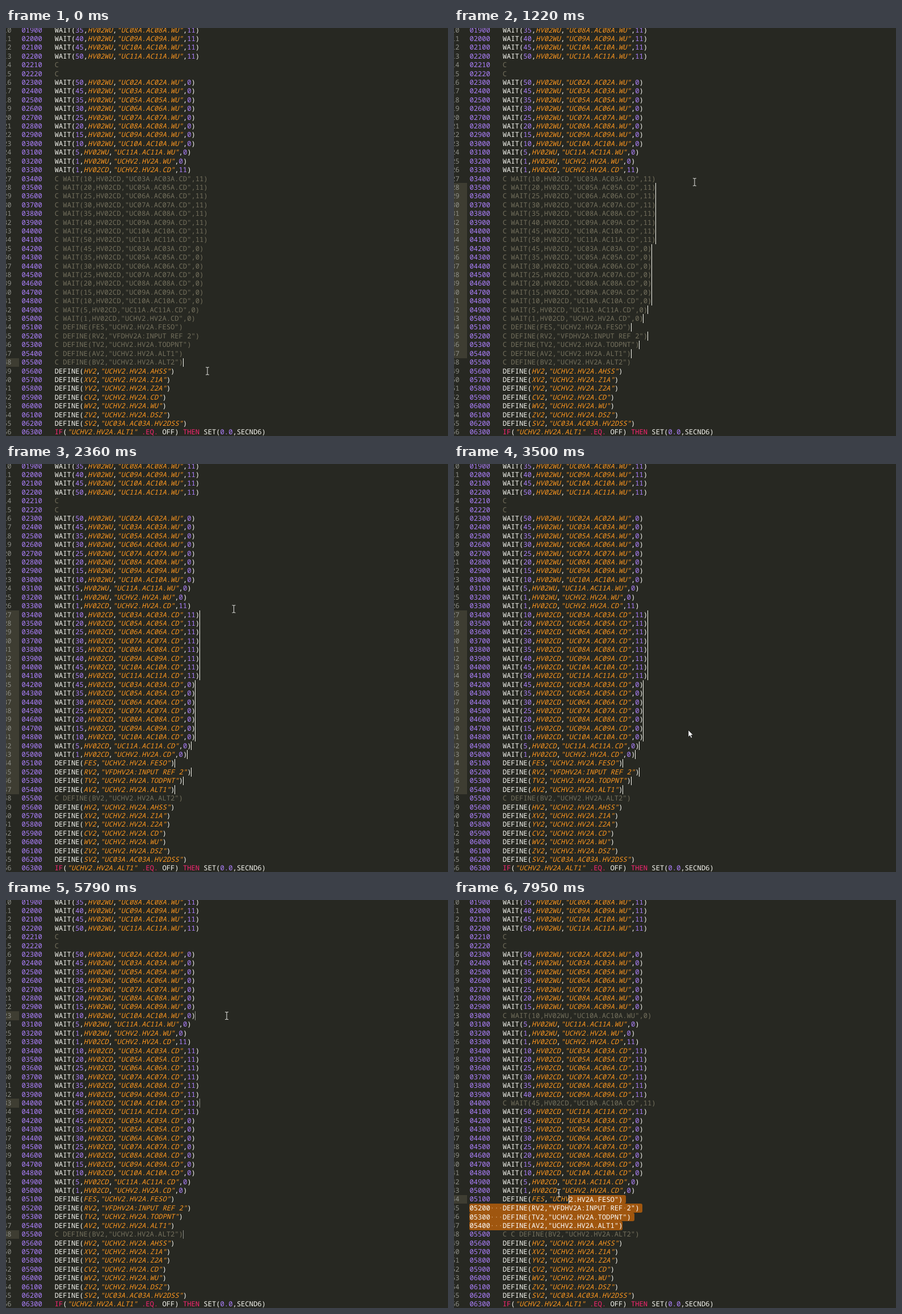
An HTML page for the animation above (8000 ms loop, 779x719 px).

```html
<!DOCTYPE html>
<html lang="en">
<head>
<meta charset="utf-8">
<title>Multi-caret editing</title>
<style>
html, body { margin: 0; width: 100%; height: 100%; overflow: hidden; background: #272822; }
#stage {
  position: relative; width: 779px; height: 719px; overflow: hidden;
  background: #272822; color: #f8f8f2;
  font: 500 12.167px/15.41px "Noto Sans Mono", "DejaVu Sans Mono", monospace;
  text-rendering: geometricPrecision; font-variant-ligatures: none;
}
#stage div { position: absolute; white-space: pre; }
#stage svg { position: absolute; left: 0; top: 0; overflow: visible; }
.no { left: -5px; color: #8f908a; }
.arg { color: #fd971f; font-style: italic; }
.key { color: #f92672; }
.num { color: #ae81ff; }
.rem { color: #75715e; }
.mark { left: 0; width: 23px; height: 15.41px; background: #3e3d32; }
.caret { width: 1px; height: 15.41px; background: #f8f8f0; }
.sel { height: 15.41px; background: #9f560f; border-radius: 3px; color: #fff; }
.sel i { font-style: normal; color: #d3a272; }
</style>
</head>
<body>
<div id="stage">
  <div id="marks"></div>
  <div id="text"></div>
  <div id="over"></div>
  <svg width="1" height="1">
    <path id="beam" d="M-3 -6.5H-1L0 -5.5L1 -6.5H3M0 -5.5V5.5M-3 6.5H-1L0 5.5L1 6.5H3" fill="none" stroke="#d6d6d2" stroke-width="1.1"/>
    <path id="arrow" d="M0 0V12L2.8 9.4L4.8 14L6.8 13.1L4.8 8.7H8.5Z" fill="#fff" stroke="#111" stroke-width=".7"/>
  </svg>
</div>
<script>
const LOOP = 8000, FIRST = 10, LAST = 56, CHAR = 7.3, PITCH = 15.41, TOP = 257.9;
const INDENT = 8, DRAG_LAG = 40;
const UNCOMMENT = 2360, COMMENT = 6200, ARROW_ON = 3500, ARROW_OFF = 3650;

const $ = id => document.getElementById(id);
const colX = col => 27.4 + col * CHAR;
const rowY = row => TOP + (row - 27) * PITCH;
const rowAt = y => 27 + Math.floor((y - TOP) / PITCH);
const span = (a, b) => Array.from({ length: b - a + 1 }, (_, i) => a + i);

// Program text: waits climb or fall by 5 per unit; unit 4 does not exist
const code = {};
let next = FIRST;
const add = s => { code[next++] = s; };
const wait = (n, kind, unit, value) => add(`WAIT(${n},HV02${kind},"${unit}.${kind}",${value})`);
const waits = (kind, value, from) => span(from, 11).filter(u => u !== 4).forEach(u => {
  const id = String(u).padStart(2, "0");
  wait(value ? 5 * u - 5 : 60 - 5 * u, kind, `UC${id}A.AC${id}A`, value);
});
const define = (name, value) => add(`DEFINE(${name},"${value}")`);

waits("WU", 11, 8);
add("C");
add("C");
waits("WU", 0, 2);
wait(1, "WU", "UCHV2.HV2A", 0);
wait(1, "CD", "UCHV2.HV2A", 11);
waits("CD", 11, 3);
waits("CD", 0, 3);
wait(1, "CD", "UCHV2.HV2A", 0);
define("FES", "UCHV2.HV2A.FESO");
define("RV2", "VFDHV2A:INPUT REF 2");
"TV2:TODPNT AV2:ALT1 BV2:ALT2 HV2:AHSS XV2:Z1A YV2:Z2A CV2:CD WV2:WU ZV2:DSZ".split(" ").forEach(p => {
  const [name, tail] = p.split(":");
  define(name, "UCHV2.HV2A." + tail);
});
define("SV2", "UC03A.AC03A.HV2DSS");
add('IF("UCHV2.HV2A.ALT1" .EQ. OFF) THEN SET(0.0,SECND6)');

function label(row) {
  const n = row < 14 ? (row + 9) * 100 : row < 16 ? 2210 + (row - 14) * 10 : (row + 7) * 100;
  return String(n).padStart(5, "0");
}

function codeAt(row, t) {
  let mark = row === 48 || (row >= 27 && row <= 47 && t < UNCOMMENT) ? "C " : "";
  if (t >= COMMENT && [23, 33, 48].includes(row)) mark += "C ";
  return mark + code[row];
}

const TOKEN = /("[^"]*"|\bHV02\w+|\b[A-Z]V2\b|\bFES\b)|(\.EQ\.|\bIF\b|\bTHEN\b)|(\b\d[\d.]*)|\w+|[^\w".]+/g;
const tag = (cls, s) => `<span class="${cls}">${s}</span>`;
const paint = s => /^C( |$)/.test(s) ? tag("rem", s) :
  s.replace(TOKEN, (m, arg, key, num) => arg ? tag("arg", m) : key ? tag("key", m) : num ? tag("num", m) : m);

// Pointer stops: arrival time, x, y, rest in ms, mouse action on arrival
const stops = [
  [0, 355, 604.5, 130],
  [400, 403, 574, 0, "column"],
  [1220, 424, 271.5, 280],
  [1790, 401.5, 255.5, 980, "release"],
  [3500, 413, 469, 150],
  [3800, 397, 466, 0, "click"],
  [4310, 390, 586, 150, "click"],
  [4590, 389, 440.5, 0],
  [5010, 423, 357, 0, "add"],
  [5420, 389, 204, 1060, "add"],
  [6990, 301, 434.5, 150],
  [7530, 389, 572, 0, "select"],
  [7950, 185, 516.5, 50]
].map(([at, x, y, rest, action]) => ({ at, x, y, rest, action }));

function pointer(t) {
  const i = stops.findLastIndex(s => s.at <= t);
  const a = stops[i], b = stops[i + 1] || a;
  const leave = a.at + a.rest;
  const u = t <= leave ? 0 : (t - leave) / (b.at - leave);
  return { x: a.x + (b.x - a.x) * u, y: a.y + (b.y - a.y) * u };
}

// Carets follow from the mouse actions so far
function caretsAt(t) {
  let rows = [48], since = 0, col;
  for (const { at, y, action } of stops) {
    if (at > t) break;
    if (!action) continue;
    since = at;
    const p = pointer(Math.max(at, t - DRAG_LAG));
    if (action === "click") rows = [rowAt(y)];
    if (action === "add") rows = [...rows, rowAt(y)];
    if (action === "release") rows = span(27, 47);
    if (action === "column") {
      rows = span(Math.max(27, rowAt(p.y)), 47);
      since = t;
    }
    if (action === "select") {
      rows = [rowAt(p.y)];
      col = Math.min(Math.round((p.x - colX(INDENT)) / CHAR), codeAt(rows[0], t).length);
      since = t;
    }
  }
  for (const edit of [UNCOMMENT, COMMENT]) if (edit <= t) since = Math.max(since, edit);
  return { rows, col, since };
}

function blink(age) {
  age %= 1000;
  return age < 370 ? 1 : age < 500 ? .5 : age < 900 ? 0 : .5;
}

const box = (cls, x, row, rest, body = "") =>
  `<div class="${cls}" style="left:${x}px;top:${rowY(row)}px;${rest}">${body}</div>`;

function selection(head, col, t) {
  return span(head, 47).map(row => {
    const raw = label(row) + "   " + codeAt(row, t);
    const from = row === head ? col + INDENT : 0;
    const width = (raw.length - from) * CHAR + (row < 47 ? 5.5 : 0);
    return box("sel", colX(from), row, `width:${width}px`, raw.slice(from).replace(/ /g, "<i>·</i>"));
  }).join("");
}

const shown = {};
function put(id, html) {
  if (shown[id] !== html) $(id).innerHTML = shown[id] = html;
}

function draw(t) {
  put("text", span(FIRST, LAST).map(row => {
    const top = `top:${rowY(row) - .4}px`;
    return `<div class="no" style="${top}">${row}</div>` +
      `<div style="left:${colX(0)}px;${top}">${tag("num", label(row))}   ${paint(codeAt(row, t))}</div>`;
  }).join(""));

  const { rows, col, since } = caretsAt(t);
  const alpha = blink(t - since);
  const carets = rows.map(row =>
    box("caret", Math.floor(colX(INDENT + (col ?? codeAt(row, t).length))), row, `opacity:${alpha}`));
  put("marks", rows.map(row => box("mark", 0, row, "")).join(""));
  put("over", (col === undefined ? "" : selection(rows[0], col, t)) + carets.join(""));

  const { x, y } = pointer(t);
  const isArrow = t >= ARROW_ON && t < ARROW_OFF;
  for (const id of ["beam", "arrow"]) {
    $(id).setAttribute("transform", `translate(${x} ${y})`);
    $(id).style.display = (id === "arrow") === isArrow ? "" : "none";
  }
}

const start = performance.now();
function frame() {
  draw(Math.max(0, performance.now() - start) % LOOP);
  requestAnimationFrame(frame);
}
frame();
</script>
</body>
</html>
```
